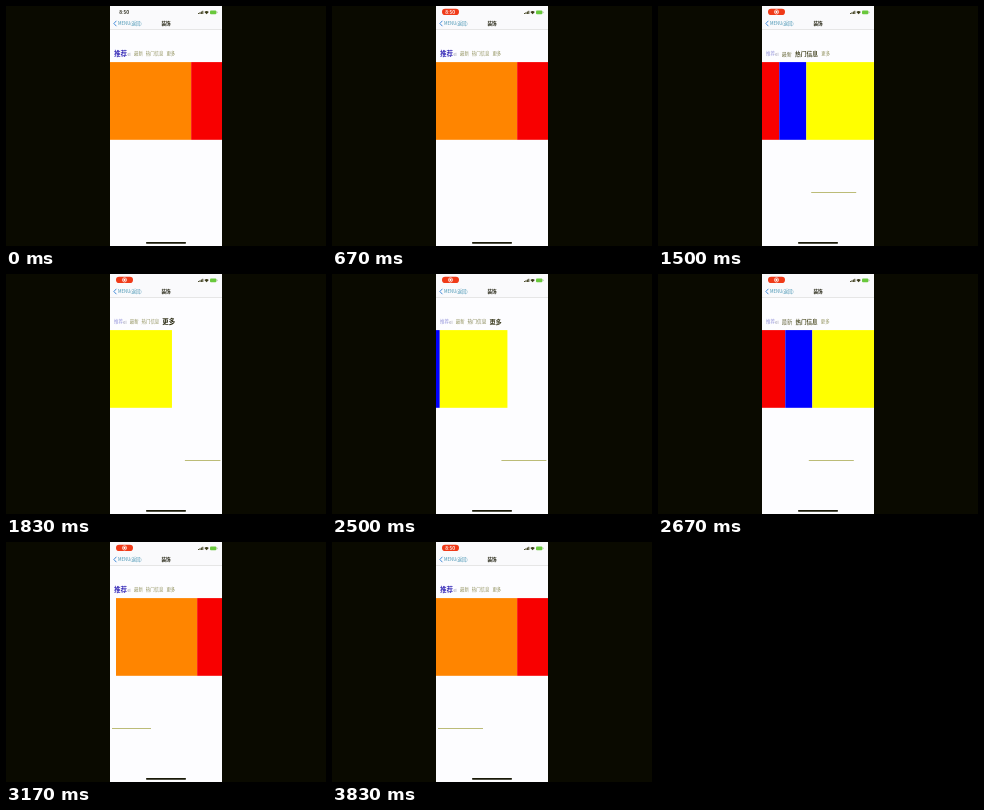
These frames come from a looping animation (320 by 240 pixels, 3.99 s). An HTML page:

```html
<!DOCTYPE html>
<html lang="en">
<head>
<meta charset="utf-8">
<title>Scrolling tabs</title>
<style>
  html, body { margin: 0; width: 100%; height: 100%; overflow: hidden; background: #0a0a00; }
  svg { display: block; width: 100vw; height: 100vh; }
  text { font-family: "Noto Sans CJK SC", "Noto Sans CJK", Inter, sans-serif; }
  .time { font: 600 4.4px Inter, sans-serif; }
</style>
</head>
<body>
<svg viewBox="0 0 320 240">
  <defs><clipPath id="screen"><rect x="104" width="112" height="240"/></clipPath></defs>
  <rect width="320" height="240" fill="#0a0a00"/>
  <g clip-path="url(#screen)">
    <rect x="104" width="112" height="240" fill="#fdfdff"/>
    <rect x="104" width="112" height="23.5" fill="#fafafc"/>
    <rect x="104" y="23" width="112" height="1" fill="#e6e6e6"/>

    <rect id="pill" y="2.7" height="6.3" rx="3.1" fill="#f03a18"/>
    <text id="clock" class="time" x="118.2" y="7.8" text-anchor="middle">8:50</text>
    <g id="record">
      <circle cx="118.5" cy="5.9" r="2.1" fill="none" stroke="#fff" stroke-width=".7"/>
      <circle cx="118.5" cy="5.9" r="1.1" fill="#fff"/>
    </g>

    <path d="M192.6 8v-1M194 8v-1.8M195.4 8v-2.5M196.8 8v-3.2" stroke="#3a3a18" stroke-width="1"/>
    <path d="M198.4 6a3.2 3.2 0 0 1 4.4 0L200.6 8.3z" fill="#3a3a18"/>
    <rect x="204" y="4.6" width="6.4" height="3.6" rx="1" fill="#69c83c"/>
    <rect x="210.8" y="5.7" width=".6" height="1.4" fill="#9a9a80"/>

    <path d="M110.4 14.8l-2.5 2.7 2.5 2.7" fill="none" stroke="#2f7fd6" stroke-width=".9"/>
    <text x="112" y="19.1" font-size="4.3" fill="#3f90b0">MENU(返回)</text>
    <text x="160" y="19.2" font-size="4.6" font-weight="700" fill="#222210" text-anchor="middle">装饰</text>

    <g id="tabs"></g>
    <g id="blocks"></g>
    <rect id="bar" y="186" height="1" fill="#bcbc78"/>
    <rect x="140" y="236.1" width="40" height="1.7" rx=".7" fill="#1a1a08"/>
  </g>
</svg>
<script>
const LOOP = 3990, LEFT = 104;
const PT = 112 / 414; // the phone is 414 points wide
const MAX_SCROLL = 586 * PT;
const SMALL = 4.4, LARGE = 6.5;
const NS = "http://www.w3.org/2000/svg";
const $ = id => document.getElementById(id);
const clamp = (v, a, b) => Math.min(b, Math.max(a, v));
const mix = (a, b, p) => a + (b - a) * p;

function set(el, attrs) {
  for (const k in attrs) el.setAttribute(k, attrs[k]);
}
function add(parent, tag, attrs, label = "") {
  const el = document.createElementNS(NS, tag);
  set(el, attrs);
  el.textContent = label;
  parent.appendChild(el);
  return el;
}

// Block start and width in points.
const blocks = [
  [0, 300, "#ff8500"], [300, 200, "#f80000"], [500, 100, "#0000ff"], [600, 250, "#ffff00"]
].map(([x, width, fill]) => ({ x: x * PT, width: width * PT, fill }));
for (const { x, width, fill } of blocks)
  add($("blocks"), "rect", { x: LEFT + x, y: 56.1, width, height: 77.7, fill });

const plain = [[142, 142, 88], [44, 44, 20]];
const accent = [[146, 146, 218], [56, 44, 184]];
const tabs = ["推荐", "最新", "热门信息", "更多"].map((label, i) => ({
  el: add($("tabs"), "text", {}, label),
  chars: label.length,
  colors: i ? plain : accent,
  gap: i ? 3 : 7
}));
const suffix = add($("tabs"), "text", { y: 49.5, "font-size": 3.8, fill: "#85859c" }, "ei");

// Time and scroll offset: swipe to the end, rebound, swipe back, rebound.
const path = [
  [1170, 0], [1330, 60], [1500, 118], [1670, 161], [1830, 168], [2000, 161], [2170, MAX_SCROLL],
  [2500, MAX_SCROLL], [2670, 112], [2830, 48.5], [3000, 5], [3170, -6], [3330, -4], [3500, -1], [3670, 0]
];
function scrollAt(t) {
  if (t <= path[0][0]) return path[0][1];
  for (let i = 1; i < path.length; i++) {
    const [t0, a] = path[i - 1], [t1, b] = path[i];
    if (t <= t1) return mix(a, b, (t - t0) / (t1 - t0));
  }
  return 0;
}

// The picture advances six times a second, on 10 ms ticks.
function stepTime(t) {
  const tick = i => Math.round(i * 100 / 6) * 10;
  let i = Math.min(23, Math.floor(t * 6 / 1000) + 1);
  while (tick(i) > t) i--;
  return tick(i);
}

function tabPosition(scroll) {
  const s = clamp(scroll, 0, blocks[3].x);
  const i = s < blocks[1].x ? 0 : s < blocks[2].x ? 1 : 2;
  return i + (s - blocks[i].x) / blocks[i].width;
}

function drawTabs(scroll) {
  const pos = tabPosition(scroll);
  let x = 108;
  tabs.forEach((tab, i) => {
    const p = clamp(1 - Math.abs(pos - i), 0, 1);
    const size = mix(SMALL, LARGE, p);
    const rgb = tab.colors[0].map((c, k) => Math.round(mix(c, tab.colors[1][k], p)));
    set(tab.el, {
      x, y: 47.7 + size * .37, "font-size": size,
      "font-weight": p > .5 ? 700 : 400, fill: `rgb(${rgb})`
    });
    x += size * tab.chars;
    if (i === 0) suffix.setAttribute("x", x + .5);
    x += tab.gap;
  });
}

function drawBar(scroll, t) {
  const over = Math.max(0, -scroll, scroll - MAX_SCROLL);
  const x = 106 + clamp(scroll, 0, MAX_SCROLL) * .4 + (scroll > MAX_SCROLL ? over : 0);
  set($("bar"), { x, width: 45 - over, visibility: t >= 1170 ? "visible" : "hidden" });
}

function drawStatus(t) {
  const on = t >= 500, icon = t >= 1000 && t < 3670;
  const width = t < 670 ? 14 : 17;
  set($("pill"), { x: 118.5 - width / 2, width, visibility: on ? "visible" : "hidden" });
  set($("clock"), { fill: on ? "#fff" : "#1c1c0c", visibility: icon ? "hidden" : "visible" });
  $("record").setAttribute("visibility", icon ? "visible" : "hidden");
}

function draw(time) {
  const t = stepTime(time % LOOP);
  const scroll = scrollAt(t);
  $("blocks").setAttribute("transform", `translate(${-scroll})`);
  drawTabs(scroll);
  drawBar(scroll, t);
  drawStatus(t);
}

const start = performance.now();
function loop() {
  draw(performance.now() - start);
  requestAnimationFrame(loop);
}
loop();
</script>
</body>
</html>
```
